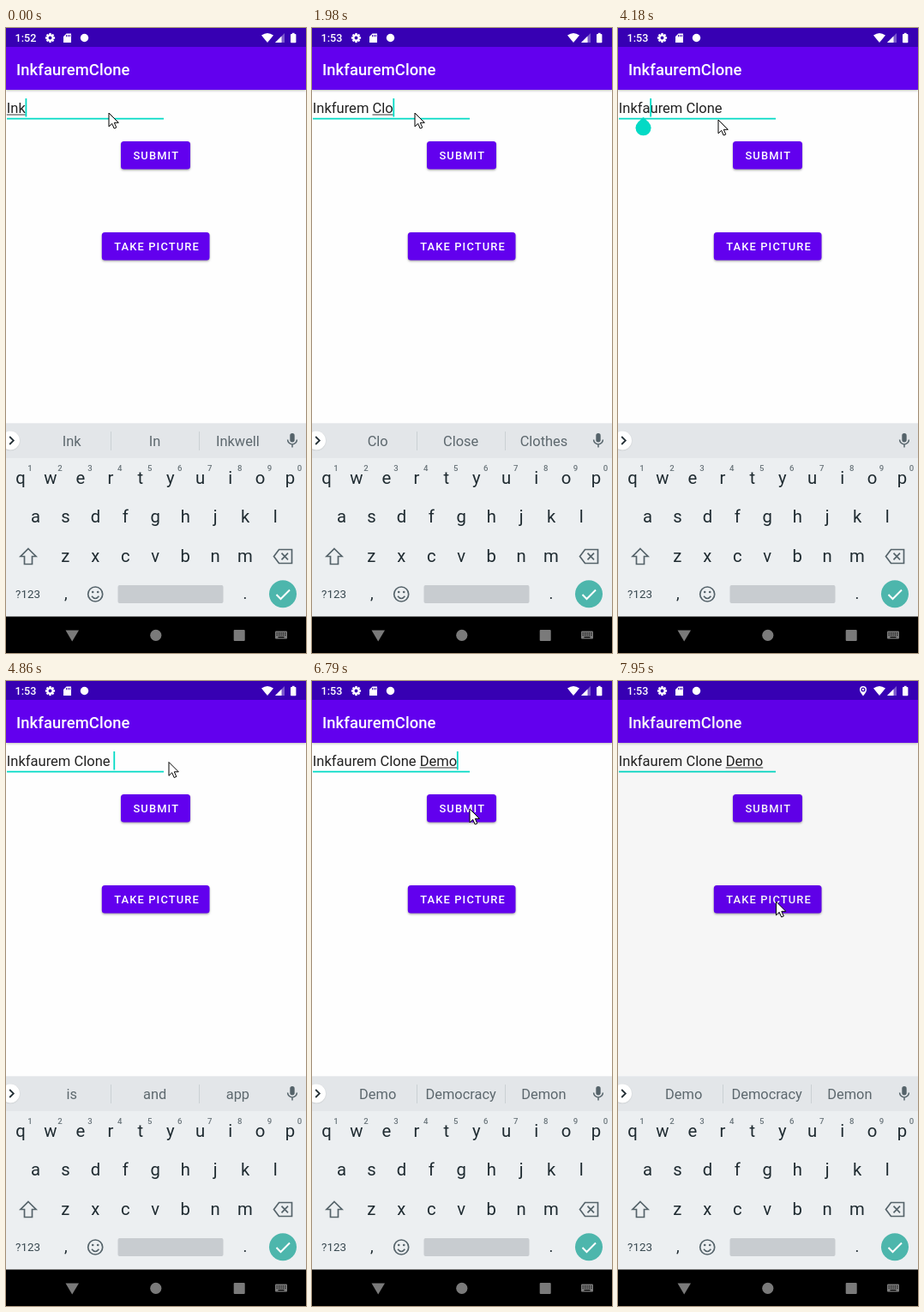
An HTML page with a canvas for the animation above (8 s loop, 350 px wide and 728 px high).

```html
<!DOCTYPE html>
<html lang="en">
<head>
<meta charset="utf-8">
<title>Typing demo</title>
<style>
html, body { margin: 0; width: 100%; height: 100%; overflow: hidden; background: #000; }
canvas { display: block; width: 350px; height: 728px; }
</style>
</head>
<body>
<canvas id="stage"></canvas>
<script>
const W = 350, H = 728, LOOP = 8000;
const PURPLE = '#6200ee', TEAL = '#03dac5', KEY = '#1f2b31', ICON = '#55636a';
const canvas = document.getElementById('stage');
const ctx = canvas.getContext('2d');
const ratio = window.devicePixelRatio || 1;
canvas.width = W * ratio;
canvas.height = H * ratio;

// Each step changes part of the state; the rest carries over.
// word: index where the underlined word starts (null for none).
// caret: index of the caret (null for the end of the text).
const NAME = 'Inkfaurem Clone';
const steps = [
  [0, { clock: '1:52', text: 'Ink', word: 0, caret: null, caretOn: true, handle: null,
        mouse: [119.5, 98], hints: ['Ink', 'In', 'Inkwell'], pin: false, dim: 0 }],
  [250, { text: 'Inkf', hints: ['Inkf', 'Ink', 'Inky'] }],
  [530, { text: 'Inkfu', hints: ['Inkfu', 'Inkfaurem', 'Ink'] }],
  [850, { text: 'Inkfur', hints: ['Inkfur', 'Inkfaurem', 'Inks'] }],
  [980, { text: 'Inkfure', clock: '1:53', hints: ['Inkfure', 'Inkfaurem', 'Inks'] }],
  [1240, { text: 'Inkfurem', hints: ['Inkfurem', 'Inkfaurem', 'Inkfaurems'] }],
  [1360, { text: 'Inkfurem ', word: null, hints: ['is', 'and', 'app'] }],
  [1600, { text: 'Inkfurem C', word: 9, hints: ['C', 'Can', 'Come'] }],
  [1860, { text: 'Inkfurem Cl', hints: ['Cl', 'Class', 'Close'] }],
  [1980, { text: 'Inkfurem Clo', hints: ['Clo', 'Close', 'Clothes'] }],
  [2180, { text: 'Inkfurem Clon', hints: ['Clon', 'Clone', 'Cloned'] }],
  [2380, { text: 'Inkfurem Clone', hints: ['Clone', 'Clones', 'Cloned'] }],
  [2820, { caretOn: false, mouse: [106, 97] }],
  [2950, { mouse: [66, 94] }],
  [3080, { mouse: [22, 91] }],
  [3230, { mouse: [-2, 89.5] }],
  [3390, { caretOn: true, mouse: [27, 94] }],
  [3790, { caret: 4, word: null, handle: 4, hints: [] }],
  [3920, { mouse: [55, 99] }],
  [4050, { mouse: [98, 105] }],
  [4180, { text: NAME, caret: 5, mouse: [116.5, 106] }],
  [4330, { handle: null, hints: ['Inkfaurem', 'Inkfaurems', 'Inkwell'] }],
  [4450, { mouse: [150, 101] }],
  [4600, { mouse: [189.5, 93.5] }],
  [4730, { caret: null, handle: 15, hints: [] }],
  [4860, { text: NAME + ' ', handle: null, hints: ['is', 'and', 'app'] }],
  [5010, { text: NAME + ' D', word: 16, hints: ['D', 'Do', 'Day'] }],
  [5270, { text: NAME + ' De', hints: ['De', 'Dear', 'Deal'] }],
  [5520, { text: NAME + ' Dem', hints: ['Dem', 'Demo', 'Demand'] }],
  [5770, { text: NAME + ' Demo', hints: ['Demo', 'Democracy', 'Demon'] }],
  [6250, { caretOn: false, mouse: [188, 98] }],
  [6380, { mouse: [186, 114] }],
  [6510, { mouse: [184, 132] }],
  [6640, { mouse: [183.5, 146] }],
  [6790, { caretOn: true, mouse: [183.5, 148] }],
  [6910, { mouse: [184, 196] }],
  [7040, { mouse: [184, 276] }],
  [7170, { mouse: [184, 258] }],
  [7300, { caretOn: false, mouse: [184, 256] }],
  [7820, { pin: true }],
  [7950, { dim: 0.033 }]
];

function stateAt(time) {
  return Object.assign({}, ...steps.filter(step => step[0] <= time).map(step => step[1]));
}

function rect(x, y, w, h, color, radius = 0) {
  ctx.fillStyle = color;
  ctx.beginPath();
  ctx.roundRect(x, y, w, h, radius);
  ctx.fill();
}

function disc(x, y, r, color) {
  ctx.fillStyle = color;
  ctx.beginPath();
  ctx.arc(x, y, r, 0, 2 * Math.PI);
  ctx.fill();
}

function fillPath(d, color) {
  ctx.fillStyle = color;
  ctx.fill(new Path2D(d));
}

function strokePath(d, color, width) {
  ctx.strokeStyle = color;
  ctx.lineWidth = width;
  ctx.stroke(new Path2D(d));
}

function setFont(size, weight = 400) {
  ctx.font = `${weight} ${size}px Roboto, sans-serif`;
}

function label(str, x, y, size, color, { weight = 400, align = 'left', spacing = 0 } = {}) {
  setFont(size, weight);
  ctx.letterSpacing = spacing + 'px';
  ctx.textAlign = align;
  ctx.fillStyle = color;
  ctx.fillText(str, x, y);
  ctx.letterSpacing = '0px';
}

function withShadow(blur, offset, alpha, draw) {
  ctx.save();
  ctx.shadowColor = `rgba(0,0,0,${alpha})`;
  ctx.shadowBlur = blur * ratio;
  ctx.shadowOffsetY = offset * ratio;
  draw();
  ctx.restore();
}

function drawStatusBar(state) {
  rect(0, 0, W, 22, '#3700b3');
  label(state.clock, 10.5, 16, 12.6, '#fff', { weight: 500 });

  // gear
  for (let i = 0; i < 8; i++) {
    ctx.save();
    ctx.translate(51.5, 11.5);
    ctx.rotate(i * Math.PI / 4);
    rect(-1.2, -5.6, 2.4, 3, '#fff');
    ctx.restore();
  }
  disc(51.5, 11.5, 4.3, '#fff');
  disc(51.5, 11.5, 1.9, '#3700b3');

  // memory card
  fillPath('M70.5 6.5H76V17H67V10Z', '#fff');
  for (const x of [70, 72, 74]) rect(x, 8, 1, 2.3, '#3700b3');

  disc(91.5, 11.5, 4.7, '#fff');
  if (state.pin) {
    fillPath('M286 17.5C283 13.5 282 12 282 10A4 4 0 0 1 290 10C290 12 289 13.5 286 17.5Z', '#fff');
    disc(286, 10, 2.5, '#3700b3');
    disc(286, 10, 1.2, '#fff');
  }
  fillPath('M305 17L298 8.4Q305 3.4 312 8.4Z', '#fff');
  fillPath('M325 6V17H314Z', 'rgba(255,255,255,.35)');
  fillPath('M321.5 9.5V17H314Z', '#fff');
  rect(332, 7, 6.4, 10.3, '#fff', 0.8);
  rect(333.8, 5.8, 2.8, 2, '#fff');
}

function drawButton(str, x, y, w, textX) {
  withShadow(2.5, 1.2, 0.35, () => rect(x, y, w, 32.5, PURPLE, 3.5));
  label(str, textX, y + 21.2, 12.9, '#fff', { weight: 500, spacing: 1.15 });
}

function drawField(state) {
  const left = 0.8, size = 16.55;
  const xAt = index => {
    setFont(size);
    return left + ctx.measureText(state.text.slice(0, index)).width;
  };
  rect(1, 104.8, 183, 1.7, TEAL);
  label(state.text, left, 99, size, '#212121');
  const end = xAt(state.text.length);
  if (state.word !== null) {
    const start = xAt(state.word);
    rect(start, 100.5, end - start, 1, '#333');
  }
  if (state.caretOn) rect(xAt(state.caret ?? state.text.length) - 0.3, 82, 1.8, 21.5, TEAL);
  if (state.handle !== null) {
    const x = xAt(state.handle) + 1;
    disc(x, 116.3, 9, TEAL);
    fillPath(`M${x} 103.8L${x + 6.4} 110H${x - 6.4}Z`, TEAL);
  }
}

function drawHints(hints) {
  rect(0, 460.5, W, 40.5, '#e3e6e9');
  hints.forEach((hint, i) => {
    label(hint, [76.7, 173.6, 270.4][i], 487, hint.length > 9 ? 15.6 : 16.4, '#5d686e', { align: 'center' });
  });
  if (hints.length) for (const x of [122, 225]) rect(x, 470, 1, 22, '#cbd0d3');
  withShadow(1.5, 0.5, 0.15, () => disc(5, 480.5, 11, '#fff'));
  strokePath('M4.2 476L8.8 480.5L4.2 485', '#263238', 1.8);
  rect(331.3, 472, 5.4, 10.5, ICON, 2.7);
  strokePath('M328.6 479.5A5.4 5.4 0 0 0 339.4 479.5M334 485V488.5', ICON, 1.5);
}

function drawKeyboard(hints) {
  rect(0, 460.5, W, 225, '#eceff1');
  drawHints(hints);
  [['qwertyuiop', 17, 531], ['asdfghjkl', 34.5, 575.5], ['zxcvbnm', 69.3, 621.5]].forEach(([row, x, y]) => {
    [...row].forEach((key, i) => label(key, x + 34.95 * i, y, 20.3, KEY, { align: 'center' }));
  });
  [...'1234567890'].forEach((digit, i) => {
    label(digit, 28 + 34.95 * i, 516, 9.6, '#6a757b', { weight: 500, align: 'center' });
  });

  // shift and backspace
  strokePath('M26 606.5L35 615.5H30.5V624.5H21.5V615.5H17Z', ICON, 1.7);
  strokePath('M312.5 615.5L318.5 607.5H333.5V623.5H318.5ZM321.5 611.7L329 619.3M329 611.7L321.5 619.3', ICON, 1.7);

  label('?123', 25.5, 664, 13.4, '#37474f', { align: 'center' });
  label(',', 69.7, 665, 18.5, KEY, { align: 'center' });
  label('.', 279, 665, 18.5, KEY, { align: 'center' });
  strokePath('M95.7 659.5A8.5 8.5 0 1 1 112.7 659.5A8.5 8.5 0 1 1 95.7 659.5M100 661.8Q104.2 667.2 108.4 661.8', ICON, 1.7);
  disc(101.2, 657, 1.3, ICON);
  disc(107.2, 657, 1.3, ICON);
  rect(130.5, 649, 123, 21, '#c8ccd0', 2);
  disc(323, 659.3, 16, '#4db6ac');
  strokePath('M315.5 660L320.5 665L331 654.5', '#fff', 2);
}

function drawNavBar() {
  const gray = '#7a7a7a';
  rect(0, 685.5, W, 43, '#000');
  fillPath('M69.5 701.5H85L77.2 714.5Z', gray);
  disc(174.8, 707.3, 6.6, gray);
  rect(265.7, 701, 13, 13, gray, 1);
  rect(314, 702.5, 14, 9, gray, 1);
  for (const y of [704.3, 706.6]) {
    for (let x = 315.6; x < 327; x += 2.4) rect(x, y, 1.2, 1.2, '#000');
  }
  rect(317.5, 709, 7, 1.2, '#000');
}

function drawMouse([x, y]) {
  ctx.save();
  ctx.translate(x, y);
  ctx.lineJoin = 'miter';
  const arrow = 'M.5 1V16.8L4.2 13.3L6.7 19L9.3 17.9L6.8 12.3H11.8Z';
  fillPath(arrow, '#fff');
  strokePath(arrow, '#000', 1);
  ctx.restore();
}

function draw(time) {
  const state = stateAt(time);
  ctx.setTransform(ratio, 0, 0, ratio, 0, 0);
  rect(0, 0, W, H, '#fefefe');
  withShadow(3, 1.2, 0.35, () => rect(0, 22, W, 50, PURPLE));
  drawStatusBar(state);
  label('InkfauremClone', 12, 54.5, 18.4, '#fff', { weight: 500, spacing: 0.1 });
  drawButton('SUBMIT', 134, 132, 81, 148.4);
  drawButton('TAKE PICTURE', 111.8, 238, 125.7, 126.2);
  drawField(state);
  if (state.dim) rect(0, 22, W, 438.5, `rgba(0,0,0,${state.dim})`);
  drawKeyboard(state.hints);
  drawNavBar();
  drawMouse(state.mouse);
}

const start = performance.now();
function tick() {
  draw((performance.now() - start) % LOOP);
  requestAnimationFrame(tick);
}
tick();
</script>
</body>
</html>
```
